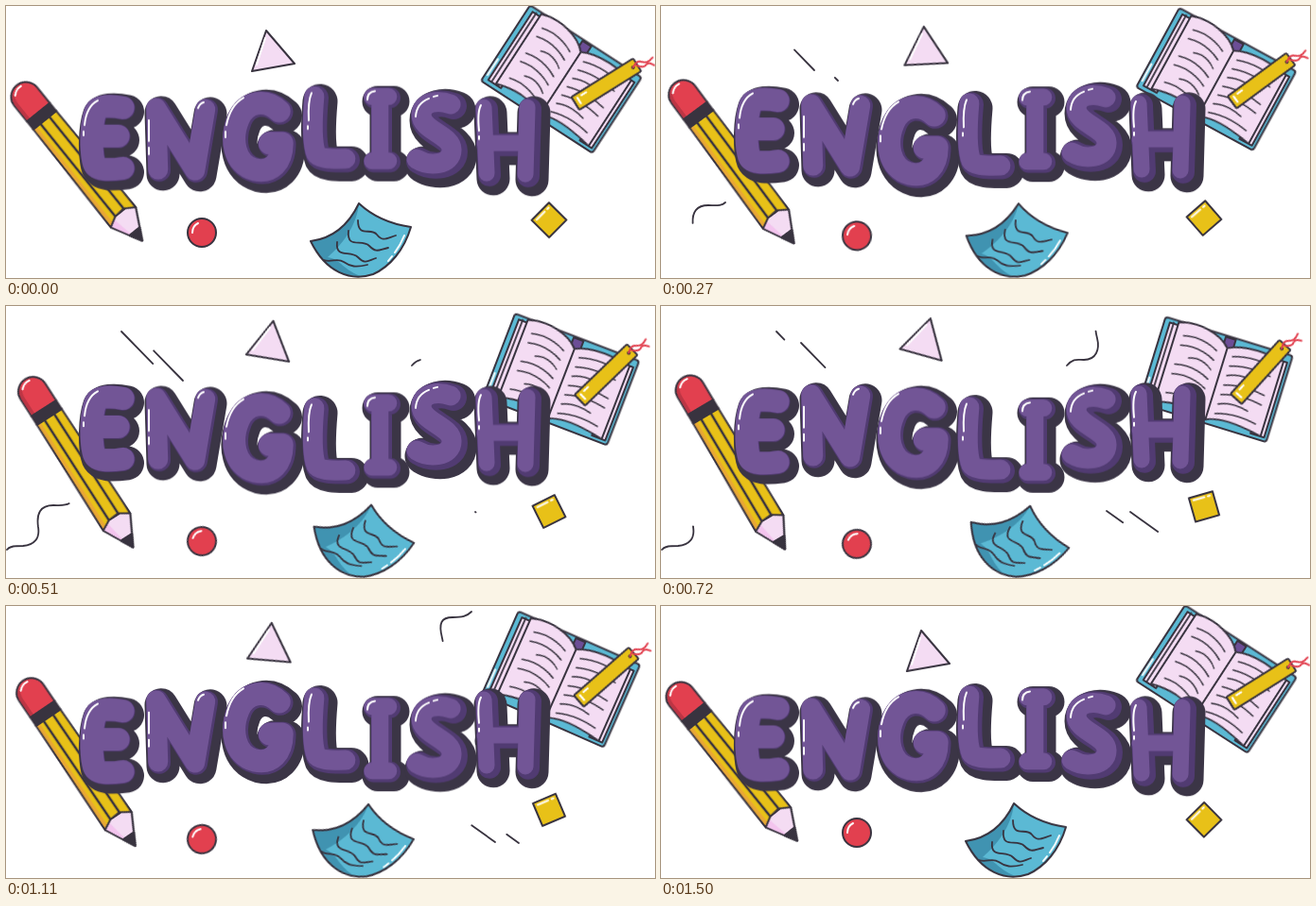
Recreate the animation shown at these times as an HTML page. Size 686 px wide and 288 px high, loop 1.53 s.

```html
<!DOCTYPE html>
<html lang="en">
<head>
<meta charset="utf-8">
<title>English</title>
<style>
  html, body { margin: 0; width: 100%; height: 100%; overflow: hidden; background: #fff; }
  svg { display: block; width: 686px; height: 288px; }
  svg * { stroke-linecap: round; stroke-linejoin: round; }
  .ink { stroke: #38333f; stroke-width: 2; }
  .line { fill: none; stroke: #38333f; stroke-width: 1.8; }
  .shine { fill: none; stroke: #fff; stroke-width: 2; }
  .yellow { fill: #e8c118; }
  .pink { fill: #f4dcf3; }
  .red { fill: #e2404f; }
  .blue { fill: #5bb9d4; }

  /* cosine-like swing: there and back in 1530 ms */
  .swing, .bob { animation: 765ms cubic-bezier(.364, 0, .636, 1) infinite alternate; }
  .swing { animation-name: swing; }
  .bob { animation-name: bob; }
  @keyframes swing { to { transform: translate(var(--x, 0), var(--y, 0)) rotate(var(--r, 0deg)); } }
  @keyframes bob { from { transform: translateY(7.2px); } to { transform: translateY(-7.2px); } }

  .trim { stroke-dasharray: 1 2; stroke-dashoffset: 1.02; animation: dash 1530ms linear infinite; }
  .trim.curl { animation-name: curl; }
  @keyframes dash {
    0% { stroke-dashoffset: 1.02; }
    22.5%, 24% { stroke-dashoffset: 0; }
    46.5%, 100% { stroke-dashoffset: -1.02; }
  }
  @keyframes curl {
    0% { stroke-dashoffset: 1.02; }
    30% { stroke-dashoffset: 0; }
    58%, 100% { stroke-dashoffset: -1.02; }
  }
</style>
</head>
<body>
<svg viewBox="0 0 686 288">
  <g id="strokes" class="line"></g>

  <!-- triangle -->
  <g class="swing" style="--x:-2px;--y:-13.3px;--r:26deg;transform-origin:280px 52px">
    <path class="ink pink" d="M275 26L305 61L260 69Z"/>
    <path class="shine" d="M274 34L265 62"/>
  </g>

  <!-- pencil -->
  <g class="swing" style="--r:8.3deg;transform-origin:75px 163px">
    <g transform="translate(75 163) rotate(51.1)">
      <path class="ink pink" d="M72-17H78L110 0L78 17H72Z"/>
      <path d="M74 9L101 4L78 16Z" fill="#f3c4ee"/>
      <path class="ink" d="M97-7L110 0L97 7Z" fill="#38333f"/>
      <path class="yellow" d="M-55-15.5L78-17L71-6L72 6L78 17L-55 15.5Z"/>
      <path d="M-55 11L75 12L78 17L-55 15.5Z" fill="#e9a834"/>
      <path class="line" style="stroke-width:2.4" d="M-55-6H71M-55 6H72"/>
      <path class="ink" fill="none" d="M-55-15.5L78-17L71-6L72 6L78 17L-55 15.5Z"/>
      <path class="ink red" d="M-65-15.5H-86A15.5 15.5 0 0 0-86 15.5H-65Z"/>
      <path d="M-65 11H-86Q-94 10-97 7Q-94 14.5-86 14.5H-65Z" fill="#bd3544"/>
      <path class="shine" d="M-94 8Q-99 3-98-3"/>
      <path class="ink" d="M-65-15.5H-54V15.5H-65Z" fill="#38333f"/>
    </g>
  </g>

  <!-- book -->
  <g class="swing" style="--r:-16deg;transform-origin:588px 79px">
    <g transform="translate(588 79) rotate(33)">
      <rect class="ink blue" x="-72" y="-48.5" width="140.5" height="95.5" rx="3"/>
      <path class="shine" d="M-69.5 18V38"/>
      <path class="ink pink" d="M-66-44H-50V42H-66ZM50-40H65V43H50Z"/>
      <path class="line" d="M-62-45V42"/>
      <rect class="ink" x="-5" y="-47" width="11" height="14" fill="#6c4d96"/>
      <path class="ink pink" d="M-57-47C-38-54-12-49 0-36V43C-14 34-40 35-57 41Z"/>
      <path class="ink pink" d="M0-36C14-44 38-44 61-40V43C38 38 14 36 0 43Z"/>
      <g id="rows" class="line" style="stroke-width:1.5"></g>
      <g transform="translate(40.8 -21.7) rotate(-65)">
        <rect class="ink yellow" x="-38" y="-8" width="77" height="16" rx="1.5"/>
        <path class="shine" d="M-33-4V3M-28-4H-22"/>
        <circle cx="34" cy="0" r="2" fill="#38333f"/>
        <path d="M34 0Q41-5 45 0T57 2M38 0Q43 7 47 5T54 10" fill="none" stroke="#e2404f" stroke-width="2"/>
      </g>
    </g>
  </g>

  <!-- sheet of paper -->
  <g class="swing" style="--x:4.5px;--y:1px;--r:23deg;transform-origin:375px 241.5px">
    <path class="blue" d="M322 249C346 246 362 232 373 209C389 224 407 231 428 234C421 258 406 276 388 284C364 292 338 282 322 249Z"/>
    <path d="M322 249C346 246 362 232 373 209C371 232 356 252 340 266C354 268 356 280 378 287C356 288 336 278 322 249Z" fill="#4093b1"/>
    <path class="ink" fill="none" d="M322 249C346 246 362 232 373 209C389 224 407 231 428 234C421 258 406 276 388 284C364 292 338 282 322 249Z"/>
    <path class="line" d="M372 227C372 246 386 234 392 242S402 246 412 243M362 238C360 258 376 246 384 254S394 258 404 256M350 250C348 268 364 258 372 266S382 270 391 267M336 269C344 272 350 266 357 271S370 277 382 274"/>
    <path class="shine" d="M421 243Q417 253 411 261M408 265L404 270"/>
  </g>

  <!-- diamond -->
  <g class="swing" style="--y:-15.5px;--r:32deg;transform-origin:574px 227px;animation-delay:-1455ms">
    <g transform="translate(574 227) rotate(-46)">
      <rect class="ink yellow" x="-13" y="-13" width="26" height="26"/>
      <path class="shine" d="M-9-9.5H3M7-9.5H9"/>
    </g>
  </g>

  <!-- ball -->
  <g class="swing" style="--y:12px;--r:25deg;transform-origin:207px 240px">
    <circle class="ink red" cx="207" cy="240" r="15"/>
    <path class="shine" d="M197 240Q197 233 203 230"/>
  </g>

  <g id="word" fill="none"></g>
</svg>
<script>
  const LOOP = 1530;
  const add = (id, html) => document.getElementById(id).innerHTML += html;

  // Each letter: lowest point in time, stroke width, depth of shade, spine, highlight
  const letters = [
    [1240, 25, 1, 'M124 108C110 105 98 106 95 112C90 126 90 152 93 165C95 175 110 174 124 172M94 138H119',
      'M83 126Q85 106 97 100M82 133V137'],
    [0, 24, 3, 'M162 174L160 109L201 175L212 110', 'M151 121V143M151 150V157M203 108Q205 103 209 102'],
    [290, 27, 3, 'M290 112C275 98 255 102 247 120C238 141 242 168 264 174C282 178 293 166 293 146H280',
      'M233 126Q237 105 251 97M232 133V139'],
    [590, 26, 5, 'M328 97C326 120 325 145 330 158Q333 164 361 163', 'M320 121Q319 101 323 92M319 127V130'],
    [880, 22, 4, 'M389 97H406M397 97V165M389 165H406', 'M382 99Q382 91 390 90'],
    [1220, 28, 7, 'M473 106C460 101 442 103 442 117C442 134 474 138 474 154C474 171 450 172 437 164',
      'M433 117Q434 103 447 98M452 96L456 95'],
    [0, 24, 7, 'M508 109L511 179M554 109L552 180M509 147H552', 'M500 132Q498 112 502 105M500 138V141'],
  ];
  const stroke = (d, color, width, dx = 0, dy = dx) =>
    `<path d="${d}" stroke="${color}" stroke-width="${width}" transform="translate(${dx} ${dy})"/>`;

  for (const [peak, width, shade, d, shine] of letters) {
    const lift = -7.2 * Math.cos(2 * Math.PI * peak / LOOP);
    add('word', `<g class="bob" style="animation-delay:${peak - LOOP}ms"><g transform="translate(0 ${lift})">
      ${stroke(d, '#3b3546', width + 11, 4)}
      ${stroke(d, '#513b72', width)}
      ${stroke(d, '#725596', width - shade, -shade * .42, -shade * .27)}
      <path class="shine" d="${shine}"/></g></g>`);
  }

  // Lines that draw themselves and run out: start time, path, kind
  const trims = [
    [87, 'M162 68L122 27', ''],
    [237, 'M187 79L148 39', ''],
    [500, 'M496 218L542 251', ''],
    [588, 'M471 217L517 250', ''],
    [45, 'M68 208C64 212 58 211 50 211C36 211 32 220 34 234C36 246 30 253 18 254C10 254 4 254 1 258', 'curl'],
    [455, 'M429 63C436 55 440 57 447 57C460 57 464 46 461 34C457 18 460 12 472 12C482 12 487 11 492 6', 'curl'],
  ];
  for (const [start, d, kind] of trims)
    add('strokes', `<path class="trim ${kind}" pathLength="1" d="${d}" style="animation-delay:${start - LOOP}ms"/>`);

  // Writing on the book pages
  for (let i = 0; i < 7; i++) {
    const y = -35 + i * 10.5, cut = i % 3 == 2 ? 12 : 0;
    add('rows', `<path d="M${-48 + cut} ${y}q${19 - cut / 2}-5 ${38 - cut} 5"/>`);
    add('rows', `<path d="M8 ${y + 6}q${20 - cut / 2}-7 ${44 - cut}-2"/>`);
  }
</script>
</body>
</html>
```
